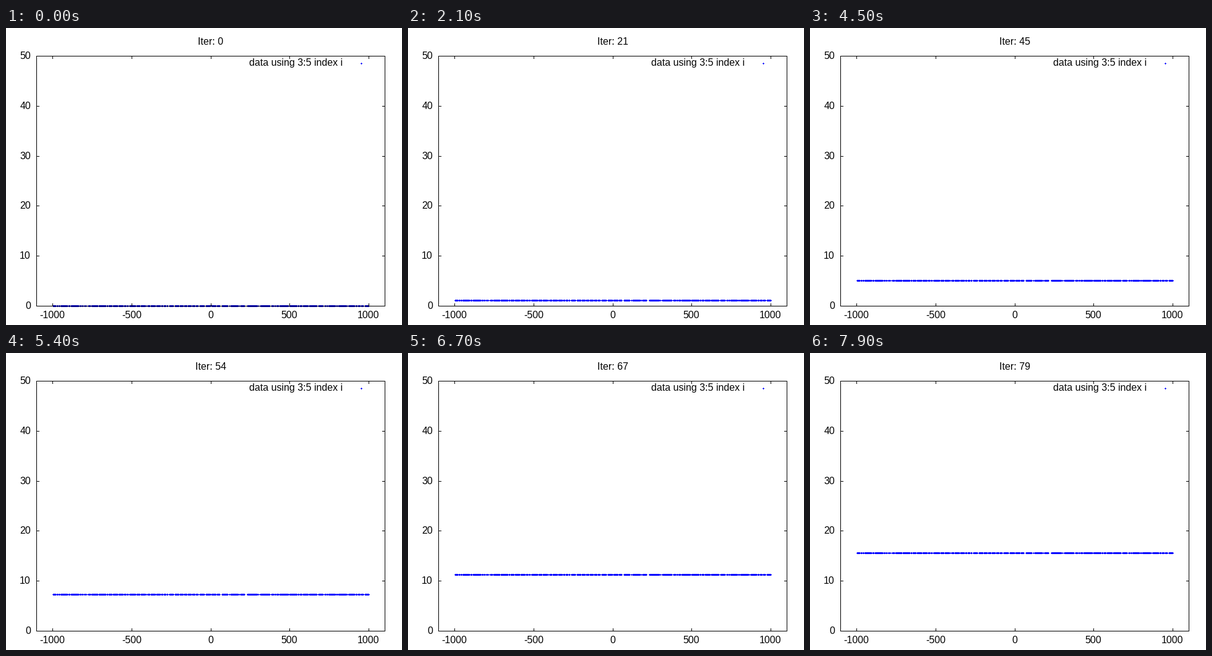
These frames come from a looping animation (640 px wide and 480 px high, 8 s). A matplotlib script:

```python
import matplotlib.pyplot as plt
import numpy as np
from matplotlib.animation import FuncAnimation
from matplotlib.collections import PolyCollection
from matplotlib.patches import Rectangle

W, H, DPI = 640, 480, 100
LEFT, RIGHT, TOP, BOTTOM = 49, 612, 45, 449
TICK = 5
FRAMES, INTERVAL = 80, 100

plt.rcParams["font.family"] = "Liberation Sans"
plt.rcParams["font.size"] = 16 * 72 / DPI
plt.rcParams["text.hinting"] = "native"

fig = plt.figure(figsize=(W / DPI, H / DPI), dpi=DPI, facecolor="white")
ax = fig.add_axes([0, 0, 1, 1])
ax.set_xlim(0, W)
ax.set_ylim(H, 0)
ax.axis("off")


def px(x):
    """Pixel column of a data x."""
    return np.floor(LEFT + (x + 1100) / 2200 * (RIGHT - LEFT) + 0.5)


def py(y):
    """Pixel row of a data y."""
    return np.floor(BOTTOM - y / 50 * (BOTTOM - TOP) + 0.5)


def bar(x, y, w, h):
    ax.add_patch(Rectangle((x, y), w, h, fc="black", lw=0, zorder=4,
                           antialiased=False, snap=False))


def label(x, y, s, ha):
    return ax.text(x, y, s, ha=ha, va="baseline", color="black")


# Plus sign three pixels wide, on the pixel grid
PLUS = np.array([(0, -1), (1, -1), (1, 0), (2, 0), (2, 1), (1, 1),
                 (1, 2), (0, 2), (0, 1), (-1, 1), (-1, 0), (0, 0)])


def pluses(xs, y):
    return [PLUS + (x, y) for x in xs]


def add_points(xs, y):
    points = PolyCollection(pluses(xs, y), facecolors="#0000ff", linewidths=0,
                            antialiaseds=False, snap=False, zorder=2)
    ax.add_collection(points, autolim=False)
    return points


# Border and ticks, in front of the points
for y in (TOP, BOTTOM):
    bar(LEFT, y, RIGHT - LEFT + 1, 1)
for x in (LEFT, RIGHT):
    bar(x, TOP, 1, BOTTOM - TOP + 1)
for v in range(-1000, 1001, 500):
    x = px(v)
    bar(x, TOP, 1, TICK)
    bar(x, BOTTOM - TICK + 1, 1, TICK)
    label(x, 469, str(v), "center")
for v in range(0, 51, 10):
    y = py(v)
    bar(LEFT, y, TICK, 1)
    bar(RIGHT - TICK + 1, y, TICK, 1)
    label(40, y + 5, str(v), "right")

# Legend and title
label(544, 61, "data using 3:5 index i", "right")
add_points([574], 57)
title = label(330.5, 27, "", "center")

# Random columns with one clear gap
rng = np.random.default_rng(7)
cols = px(rng.uniform(-996, 1000, 1000))
cols = np.unique(np.append(cols, [76, 385, 390, 586]))
cols = cols[(cols <= 385) | (cols >= 390)]
points = add_points(cols, BOTTOM)


def update(i):
    title.set_text(f"Iter: {i}")
    points.set_verts(pluses(cols, py(0.0025 * i * i)))
    return title, points


anim = FuncAnimation(fig, update, frames=FRAMES, interval=INTERVAL,
                     repeat=True, repeat_delay=0)
plt.show()
```
